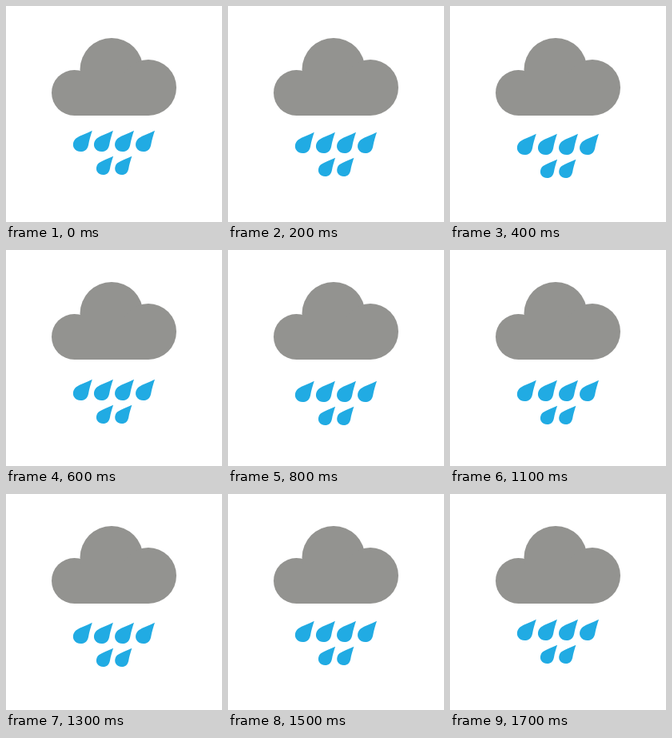
These frames come from a looping animation (270 px wide and 270 px high, 1800 ms). An HTML page:

```html
<!DOCTYPE html>
<html lang="en">
<head>
<meta charset="utf-8">
<title>Rain cloud</title>
<style>
  html, body { margin: 0; width: 100%; height: 100%; overflow: hidden; background: #fff; }
  svg { display: block; width: 100%; height: 100%; }
  .cloud { fill: #939390; }
  .rain { fill: #21abe3; animation: bob 1.8s steps(9) infinite; }
  /* one pixel per 100 ms, down and back up */
  @keyframes bob {
    0%, 100% { transform: translateY(0); }
    50% { transform: translateY(9px); }
  }
</style>
</head>
<body>
<svg viewBox="0 0 270 270">
  <defs>
    <!-- origin at the tip -->
    <path id="drop" d="M0 0C-8 4-15 6-20 9.5C-24 12.5-24.8 18-23 21.5C-20.5 26-15.5 27-11.5 26C-7.5 25-5.5 21.5-4.7 17.5C-3.8 12-2 6 0 0Z"/>
    <use id="small" href="#drop" transform="scale(.885)"/>
  </defs>
  <g class="cloud">
    <circle cx="85.5" cy="108.5" r="28.5"/>
    <circle cx="132" cy="79.5" r="39.5"/>
    <circle cx="178" cy="102" r="35"/>
    <path d="M85.5 137V90H178V137Z"/>
  </g>
  <g class="rain">
    <use href="#drop" x="107.8" y="155.7"/>
    <use href="#drop" x="133.9" y="155.7"/>
    <use href="#drop" x="160" y="155.7"/>
    <use href="#drop" x="186" y="155.7"/>
    <use href="#small" x="134.1" y="187.7"/>
    <use href="#small" x="157.4" y="187.7"/>
  </g>
</svg>
</body>
</html>
```
